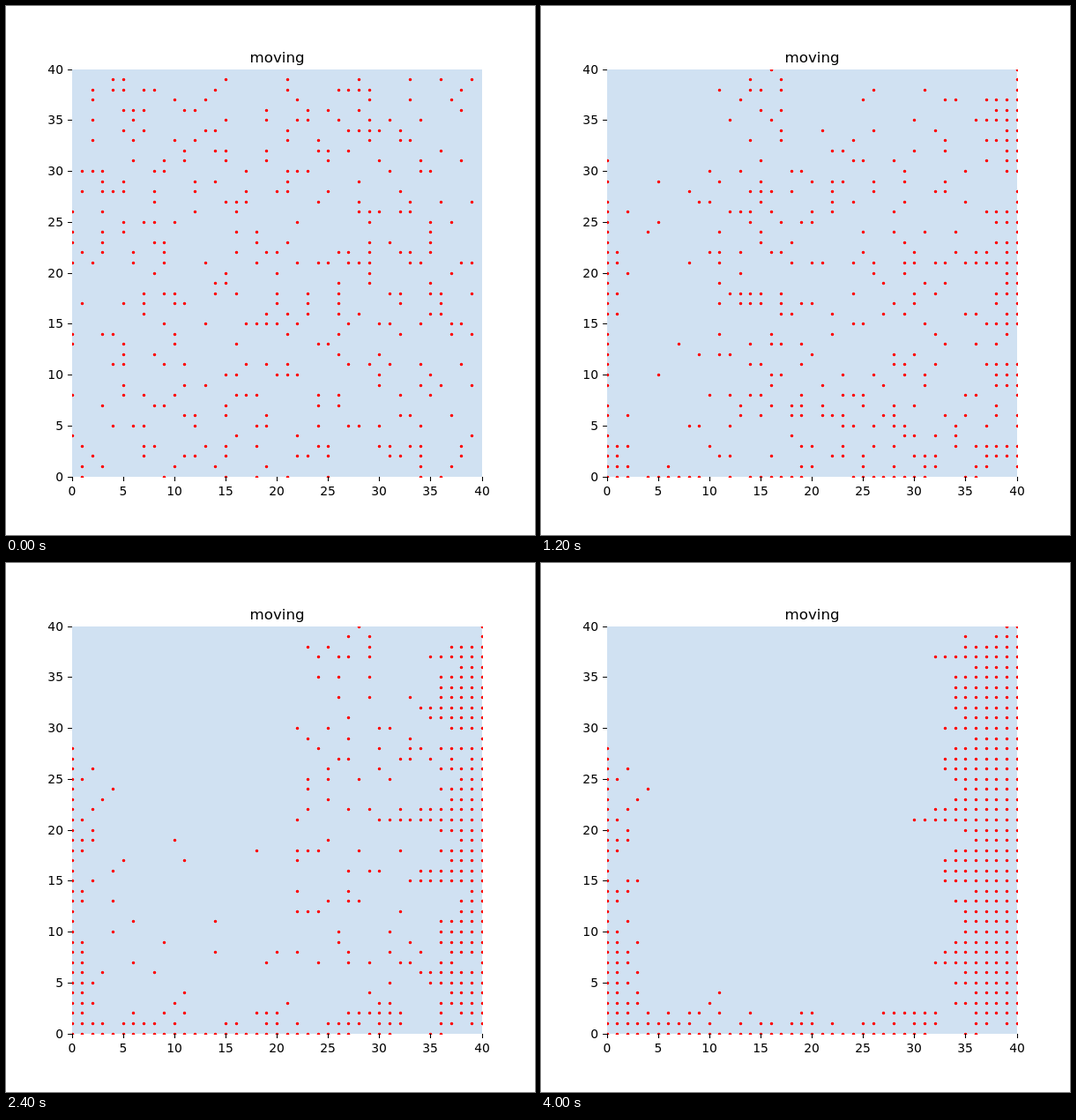
Write an HTML page that moves like this. It is 600 px wide and 600 px high and loops after 4.1 s.

```html
<!DOCTYPE html>
<html lang="en">
<head>
<meta charset="utf-8">
<title>moving</title>
<style>
  html, body { margin: 0; width: 100%; height: 100%; overflow: hidden; background: #fff; }
  svg { display: block; width: 600px; height: 600px; font-family: "DejaVu Sans", sans-serif; font-size: 13.89px; }
</style>
</head>
<body>
<svg viewBox="0 0 600 600">
  <clipPath id="area"><rect x="75" y="72" width="466" height="463"/></clipPath>
  <rect width="600" height="600" fill="#fff"/>
  <rect x="75" y="72" width="465" height="462" fill="#d0e1f2"/>
  <path id="dots" clip-path="url(#area)" fill="none" stroke="#f00" stroke-width="3.6" stroke-linecap="round"/>
  <path id="ticks" fill="none" stroke="#000" stroke-width="1.1"/>
  <g id="labels"></g>
  <text x="307.5" y="64" text-anchor="middle" font-size="16.67">moving</text>
</svg>
<script>
const STEP = 100, STEPS = 41, SIZE = 40;
const COUNT = 400, RIGHT_SHARE = 0.7, DRIFT = 0.04;
const $ = id => document.getElementById(id);
const px = x => Math.floor(75 + x * 11.625) + 0.5;
const py = y => Math.floor(534 - y * 11.55 + 1e-6) + 0.5;
const clamp = v => Math.max(0, Math.min(SIZE, v));

let seed = 4127;
function rand() {
  seed = (seed + 0x6d2b79f5) | 0;
  let v = Math.imul(seed ^ (seed >>> 15), 1 | seed);
  v = (v + Math.imul(v ^ (v >>> 7), 61 | v)) ^ v;
  return ((v ^ (v >>> 14)) >>> 0) / 4294967296;
}
const randCell = () => Math.floor(rand() * SIZE);

// Most walkers head for the right wall, the rest go diagonally down to the left.
// Nobody enters an occupied cell, so they queue up along the walls.
const walkers = Array.from({ length: COUNT }, (_, i) => ({
  x: randCell(), y: randCell(), right: i < COUNT * RIGHT_SHARE
}));
const crowd = new Map();
const cell = (x, y) => y * (SIZE + 1) + x;
const add = (key, n) => crowd.set(key, (crowd.get(key) || 0) + n);
walkers.forEach(w => add(cell(w.x, w.y), 1));

function advance(w) {
  const drift = w.right && rand() < DRIFT ? (rand() < 0.5 ? 1 : -1) : 0;
  const x = clamp(w.x + (w.right ? 1 : -1));
  const y = w.right ? (w.x < SIZE ? clamp(w.y + drift) : w.y) : clamp(w.y - 1);
  if (crowd.get(cell(x, y))) return;
  add(cell(w.x, w.y), -1);
  add(cell(x, y), 1);
  w.x = x;
  w.y = y;
}

const outline = () => walkers.map(w => `M${px(w.x)} ${py(w.y)}h0`).join("");
const paths = [outline()];
while (paths.length < STEPS) {
  walkers.forEach(advance);
  paths.push(outline());
}

function addAxes() {
  let ticks = "", labels = "";
  for (let v = 0; v <= SIZE; v += 5) {
    const x = px(v), y = py(v);
    ticks += `M${x} 534v5M75 ${y}h-5`;
    labels += `<text x="${x - 0.5}" y="555" text-anchor="middle">${v}</text>` +
      `<text x="65" y="${Math.round(y + 4.6)}" text-anchor="end">${v}</text>`;
  }
  $("ticks").setAttribute("d", ticks);
  $("labels").innerHTML = labels;
}

let shown = -1;
function draw(now) {
  const t = Math.floor(now / STEP) % STEPS;
  if (t === shown) return;
  shown = t;
  $("dots").setAttribute("d", paths[t]);
}

addAxes();
draw(0);
let begin;
requestAnimationFrame(function tick(now) {
  begin ??= now;
  draw(now - begin);
  requestAnimationFrame(tick);
});
</script>
</body>
</html>
```
